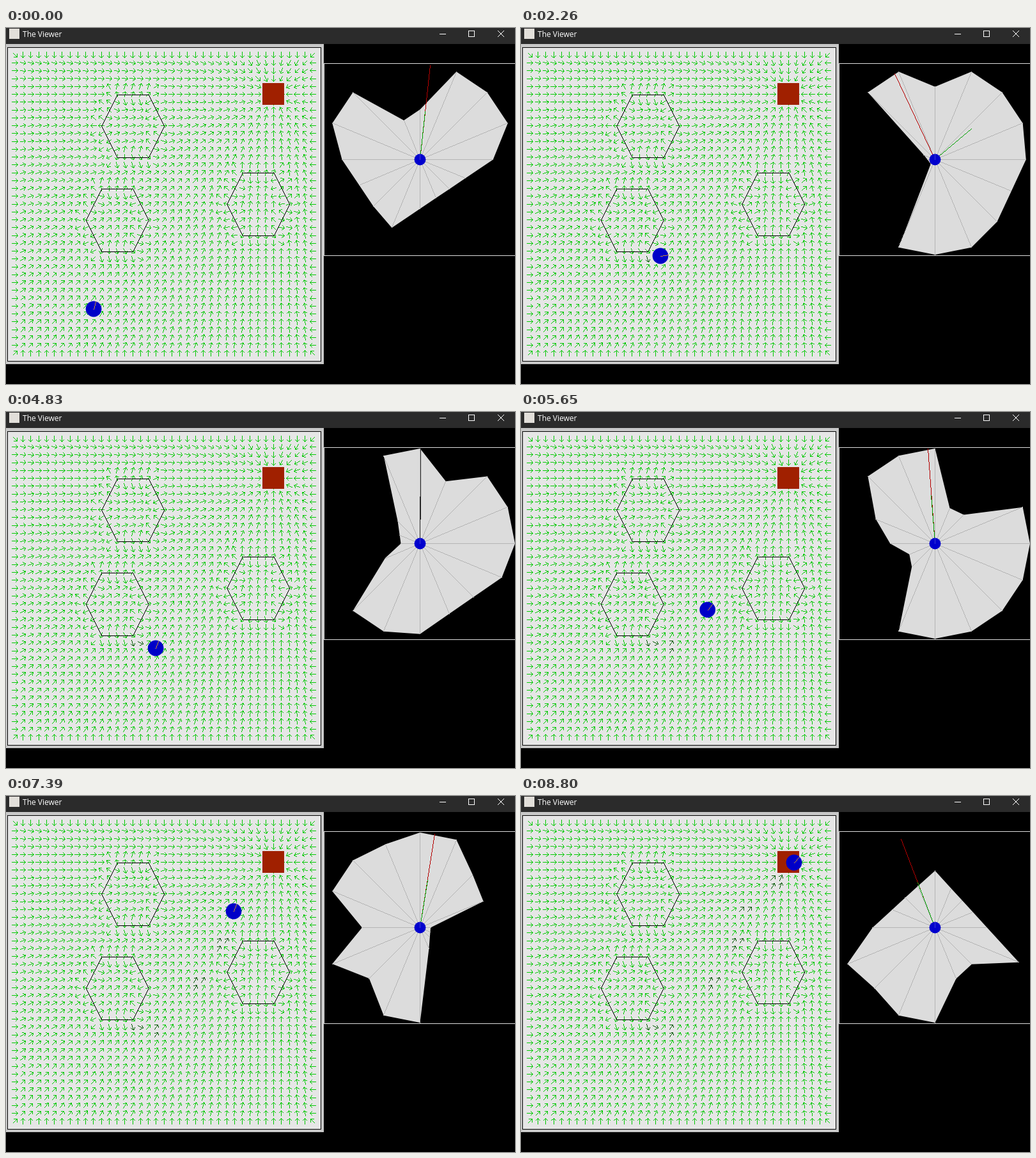
Animation of 796 by 556 pixels, one loop 8850 ms. Source, as an HTML page with a canvas:

```html
<!DOCTYPE html>
<html lang="en">
<head>
<meta charset="utf-8">
<title>The Viewer</title>
<style>
html, body { margin: 0; width: 100%; height: 100%; overflow: hidden; background: #000; }
canvas { display: block; }
</style>
</head>
<body>
<canvas id="stage" width="796" height="556"></canvas>
<script>
const LOOP = 8850, RAD = Math.PI / 180;
const CELL = 12.25, LEFT = 2, TOP = 30, SIDE = 490, COUNT = 39;
const GOAL = [418, 103];
const VIEW = { x: 647, y: 205, scale: 0.75, range: 198 };
const SENSOR = { lag: 250, dy: -4 };

// Waypoints of the robot: time, x, y, heading in degrees
const route = [
  [-250, 137, 439, 56], [0, 137, 439, 75], [100, 145, 420, 55],
  [900, 182, 373, 46], [1540, 182, 373, 46],
  [2010, 212, 352, 25], [2260, 218, 356, 12], [2900, 218, 356, -38],
  [3100, 234, 369, -37.5], [4830, 234, 369, 71], [5010, 254, 342, 55],
  [6150, 321, 283, 47], [6400, 317, 275, 67],
  [7140, 349, 222, 68], [7390, 356, 180, 70], [7710, 356, 180, 60],
  [8550, 412, 122, 47.5], [8800, 427, 104, 48]
];

// Arrows around these spots stay dark once the robot has passed
const trail = [[204, 358], [235, 366], [300, 291], [337, 231], [350, 180], [400, 133]];

const ctx = document.getElementById("stage").getContext("2d");

function pose(t) {
  const i = route.findIndex(k => k[0] > t);
  if (i < 0) return route[route.length - 1].slice(1);
  const a = route[i - 1], b = route[i], u = (t - a[0]) / (b[0] - a[0]);
  return a.slice(1).map((v, n) => v + (b[n + 1] - v) * u);
}

// One-pixel line without smoothing
function line(g, x0, y0, x1, y1, color) {
  x0 = Math.round(x0); y0 = Math.round(y0);
  const dx = Math.round(x1) - x0, dy = Math.round(y1) - y0;
  const n = Math.max(Math.abs(dx), Math.abs(dy), 1);
  g.fillStyle = color;
  for (let i = 0; i <= n; i++) {
    g.fillRect(Math.round(x0 + dx * i / n), Math.round(y0 + dy * i / n), 1, 1);
  }
}

function outline(g, pts, color) {
  edgesOf(pts).forEach(([a, b]) => line(g, ...a, ...b, color));
}

function disc(x, y, r, color) {
  ctx.fillStyle = color;
  ctx.beginPath();
  ctx.arc(x, y, r, 0, 7);
  ctx.fill();
}

const edgesOf = pts => pts.map((p, i) => [p, pts[(i + 1) % pts.length]]);
const hexes = [[16, 10], [14, 22], [32, 20]].map(([cx, cy]) => {
  const c = [LEFT + cx * CELL, TOP + cy * CELL];
  const shape = [[-4, 0], [-2, -4], [2, -4], [4, 0], [2, 4], [-2, 4]];
  return { c, pts: shape.map(([x, y]) => [c[0] + x * CELL, c[1] + y * CELL]) };
});
const room = [[LEFT, TOP], [LEFT + SIDE, TOP], [LEFT + SIDE, TOP + SIDE], [LEFT, TOP + SIDE]];
const walls = [room, ...hexes.map(h => h.pts)].flatMap(edgesOf);

// Vector pushing away from the nearest point of a hexagon, or null when far
function push(hex, x, y) {
  let best = null, min = 1.5 * CELL;
  for (const [a, b] of edgesOf(hex.pts)) {
    const ex = b[0] - a[0], ey = b[1] - a[1];
    const u = Math.max(0, Math.min(1, ((x - a[0]) * ex + (y - a[1]) * ey) / (ex * ex + ey * ey)));
    const vx = x - a[0] - u * ex, vy = y - a[1] - u * ey, d = Math.hypot(vx, vy);
    if (d < min) { min = d; best = [vx, vy]; }
  }
  if (best && min < 0.6) best = [x - hex.c[0], y - hex.c[1]];
  return best;
}

function flow(i, j, x, y) {
  const wx = (i === 1) - (i === COUNT), wy = (j === 1) - (j === COUNT);
  if (wx || wy) return Math.atan2(wy, wx);
  const goal = Math.atan2(GOAL[1] - y, GOAL[0] - x);
  for (const hex of hexes) {
    const p = push(hex, x, y);
    if (!p) continue;
    const d = Math.hypot(...p);
    return Math.atan2(p[1] / d + 0.3 * Math.sin(goal), p[0] / d + 0.3 * Math.cos(goal));
  }
  return goal;
}

const arrows = [];
for (let j = 1; j <= COUNT; j++) for (let i = 1; i <= COUNT; i++) {
  const x = LEFT + i * CELL, y = TOP + j * CELL;
  arrows.push({ x, y, a: flow(i, j, x, y) });
}

function drawArrow(g, { x, y, a }, color) {
  const c = Math.cos(a) * 4.5, s = Math.sin(a) * 4.5;
  const cx = x - 0.5, cy = y - 0.5, tx = cx + c, ty = cy + s;
  line(g, cx - c, cy - s, tx, ty, color);
  for (const turn of [-45, 45]) {
    const b = a + turn * RAD;
    line(g, tx, ty, tx - 4.5 * Math.cos(b), ty - 4.5 * Math.sin(b), color);
  }
}

function paintBackdrop() {
  const cv = document.createElement("canvas");
  cv.width = 796; cv.height = 556;
  const g = cv.getContext("2d");
  const box = (x, y, w, h, color) => { g.fillStyle = color; g.fillRect(x, y, w, h); };
  box(0, 0, 796, 556, "#000");
  box(0, 0, 796, 25, "#2b2b2b");
  box(5, 1, 16, 16, "#e2dfda");
  g.fillStyle = g.strokeStyle = "#fff";
  g.font = "12px 'Open Sans', 'Noto Sans', sans-serif";
  g.fillText("The Viewer", 26, 14);
  box(678, 9, 10, 1, "#fff");
  outline(g, [[723, 4], [732, 4], [732, 13], [723, 13]], "#fff");
  g.beginPath();
  g.moveTo(769, 4); g.lineTo(779, 14);
  g.moveTo(779, 4); g.lineTo(769, 14);
  g.stroke();
  box(0, 25, 497, 500, "#c8c8c8");
  box(LEFT, TOP, SIDE, SIDE, "#e6e6e6");
  outline(g, room, "#000");
  arrows.forEach(a => drawArrow(g, a, "#00c800"));
  box(401, 86, 34, 34, "#a02000");
  return cv;
}
const backdrop = paintBackdrop();

function cast(x, y, dx, dy) {
  let reach = VIEW.range;
  for (const [a, b] of walls) {
    const ex = b[0] - a[0], ey = b[1] - a[1], det = dx * ey - dy * ex;
    if (Math.abs(det) < 1e-9) continue;
    const px = a[0] - x, py = a[1] - y;
    const d = (px * ey - py * ex) / det, u = (px * dy - py * dx) / det;
    if (d > 0 && u >= 0 && u <= 1) reach = Math.min(reach, d);
  }
  return reach;
}

function drawMap(t) {
  const [x, y, h] = pose(t);
  for (const [sx, sy] of trail) {
    if (x < sx + 12) continue;
    arrows.filter(a => Math.hypot(a.x - sx, a.y - sy) < 10)
      .forEach(a => drawArrow(ctx, a, "#005a00"));
  }
  hexes.forEach(hex => outline(ctx, hex.pts, "#000"));
  disc(x, y, 12.4, "#0000c8");
  line(ctx, x, y, x + 12 * Math.cos(h * RAD), y - 12 * Math.sin(h * RAD), "#c88c32");
}

function drawSensors(t) {
  const [x, mapY, h] = pose(t - SENSOR.lag), y = mapY + SENSOR.dy;
  const at = (deg, r) => [VIEW.x + r * Math.cos(deg * RAD), VIEW.y - r * Math.sin(deg * RAD)];
  const tips = Array.from({ length: 16 }, (_, i) => {
    const deg = i * 22.5, w = (deg + h - 90) * RAD;
    return at(deg, VIEW.scale * cast(x, y, Math.cos(w), -Math.sin(w)));
  });
  ctx.fillStyle = "#dcdcdc";
  ctx.beginPath();
  tips.forEach(([px, py]) => ctx.lineTo(px + 0.5, py + 0.5));
  ctx.fill();
  tips.forEach(p => line(ctx, VIEW.x, VIEW.y, ...p, "#b4b4b4"));

  // Red points to the goal, green to the steering aim; both go dark when lined up
  const goal = Math.atan2(y - GOAL[1], GOAL[0] - x) / RAD;
  const avoiding = t > 1800 && t < 3600;
  const aim = avoiding ? -25 : goal;
  const aligned = Math.abs(goal - h) < 2.5;
  line(ctx, VIEW.x, VIEW.y, ...at(goal - h + 90, 148), aligned ? "#282828" : "#b40000");
  line(ctx, VIEW.x, VIEW.y, ...at(aim - h + 90, 75), aligned ? "#282828" : "#00a000");
  disc(VIEW.x + 0.5, VIEW.y + 0.5, 9, "#0000cd");
  line(ctx, VIEW.x, VIEW.y, VIEW.x, VIEW.y - 8, "#3c3cd2");
  ctx.fillStyle = "#dcdcdc";
  ctx.fillRect(497, 55, 299, 1);
  ctx.fillRect(497, 355, 299, 1);
  ctx.fillRect(497, 55, 1, 301);
}

function frame() {
  const t = performance.now() % LOOP;
  ctx.drawImage(backdrop, 0, 0);
  drawMap(t);
  drawSensors(t);
  requestAnimationFrame(frame);
}
frame();
</script>
</body>
</html>
```
